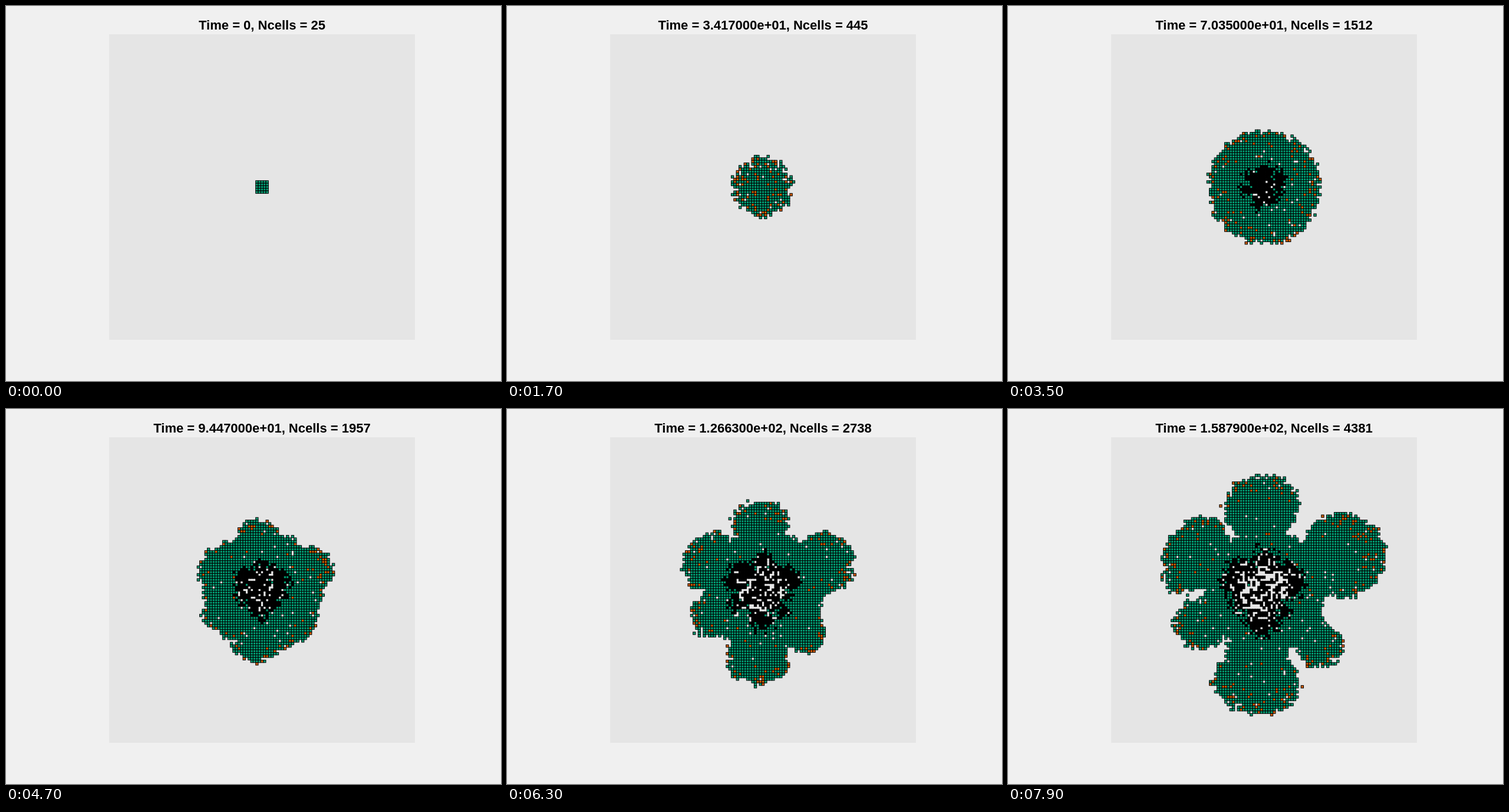
An HTML page with a canvas for the animation above (8 s loop, 840 by 637 pixels).

```html
<!DOCTYPE html>
<html lang="en">
<head>
<meta charset="utf-8">
<title>Growing cell colony</title>
<style>
  html, body { margin: 0; width: 100%; height: 100%; overflow: hidden; background: #f0f0f0; }
  canvas, svg { position: absolute; left: 0; top: 0; }
  text { font: bold 22px "Liberation Sans", Arial, sans-serif; text-anchor: middle; fill: #000; }
</style>
</head>
<body>
<canvas id="stage" width="840" height="637"></canvas>
<svg width="840" height="637"><text id="title" x="434.5" y="40"></text></svg>
<script>
const STEPS = 80, STEP_MS = 100, TIME_STEP = 2.01;
const PITCH = 4.325, REACH = 52, CX = 434.5, CY = 307.5;
const GREEN = '#009e73', ORANGE = '#d55e00', BLACK = '#000';
const BUDDING = 47;     // step at which the lobes break away
const SUPPLY = 60;      // depth in pixels that nutrients reach
const ctx = document.getElementById('stage').getContext('2d');
const title = document.getElementById('title');

// Lobes at the end: direction in degrees, tip distance, half length, half width
const LOBES = [
  [-92, 196, 53, 63], [-24, 216, 71, 71], [45, 173, 38, 38],
  [95, 210, 55, 73], [152, 165, 42, 43], [207, 181, 47, 70]
];
// Cell count at a few steps
const COUNT = [[0, 25], [17, 445], [35, 1512], [47, 1957], [63, 2738], [71, 3357], [79, 4381]];

const clamp = v => Math.max(0, Math.min(1, v));
const lerp = (a, b, p) => a + (b - a) * p;

function hash(i, j, seed) {
  let h = Math.imul(i + 400, 374761393) ^ Math.imul(j + 700, 668265263) ^ Math.imul(seed + 11, 1274126177);
  h = Math.imul(h ^ (h >>> 15), 2246822519);
  h = Math.imul(h ^ (h >>> 13), 3266489917);
  return ((h ^ (h >>> 16)) >>> 0) / 4294967296;
}

function smoothNoise(x, y, seed) {
  const i = Math.floor(x), j = Math.floor(y);
  const row = n => lerp(hash(i, n, seed), hash(i + 1, n, seed), x - i);
  return lerp(row(j), row(j + 1), y - j) - 0.5;
}

// Round body, lobes and dead core at one step
function shapeAt(k) {
  const body = 104 / (1 + Math.exp((17.5 - k) / 7.2));
  const core = Math.min(body - SUPPLY, 1.37 * k - 14);
  const early = Math.min(1, k / BUDDING) ** 0.9;
  const late = clamp((k - BUDDING) / (STEPS - 1 - BUDDING));
  const size = end => early * lerp(20 + 0.33 * end, end, late ** 1.7);
  const lobes = LOBES.map(([deg, end, halfLength, halfWidth]) => {
    const tip = early * lerp(60 + 0.3 * end, end, late ** 1.2);
    const a = size(halfLength), b = size(halfWidth), angle = deg * Math.PI / 180;
    return {
      cos: Math.cos(angle), sin: Math.sin(angle), a, b, centre: tip - a,
      deadCentre: Math.min(core, 0.42 * tip * lerp(0.6, 1, late)),
      deadRadius: Math.min(core, 0.45 * b)
    };
  });
  return { body, core, lobes };
}

// Signed distances, negative inside; x and y are measured from the centre
function lobeDistance(x, y, { cos, sin, a, b, centre }) {
  const u = x * cos + y * sin, v = y * cos - x * sin;
  const head = (Math.hypot((u - centre) / a, v / b) - 1) * Math.min(a, b);
  return u > 0 && u < centre ? Math.min(head, Math.abs(v) - 0.7 * b) : head;
}

function colonyDistance(x, y, { body, lobes }) {
  return Math.min(Math.hypot(x, y) - body, ...lobes.map(l => lobeDistance(x, y, l)));
}

function coreDistance(x, y, { core, lobes }) {
  if (core <= 0) return Infinity;
  return Math.min(Math.hypot(x, y) - core, ...lobes.map(l =>
    Math.hypot(x - l.cos * l.deadCentre, y - l.sin * l.deadCentre) - l.deadRadius));
}

const shapes = Array.from({ length: STEPS }, (_, k) => shapeAt(k));

function firstStep(test, from) {
  for (let k = from; k < STEPS; k++) if (test(shapes[k])) return k;
  return Infinity;
}

function makeCell(i, j) {
  const x = i * PITCH, y = j * PITCH;
  const rough = (seed, broad, fine) =>
    smoothNoise(i / 3, j / 3, seed) * broad + (hash(i, j, seed + 1) - 0.5) * fine;

  const edge = rough(1, 9, 8);
  const seeded = Math.max(Math.abs(i), Math.abs(j)) <= 2;
  const born = seeded ? 0 : firstStep(s => colonyDistance(x, y, s) + edge < 0, 1);
  if (born === Infinity) return null;

  const fringe = rough(3, 10, 16) + (hash(i, j, 5) > 0.93 ? 14 : 0);
  const dies = firstStep(s => coreDistance(x, y, s) + fringe < 0, born);
  const gone = dies + 60 * (-Math.log(1 - hash(i, j, 6))) ** (1 / 1.3);
  return { i, j, born, dies, gone, left: CX + x - PITCH / 2, top: CY + y - PITCH / 2 };
}

const cells = [];
for (let j = -REACH; j <= REACH; j++) {
  for (let i = -REACH; i <= REACH; i++) {
    const cell = makeCell(i, j);
    if (cell) cells.push(cell);
  }
}

// Fill colour of a cell at a step, or null where the site is empty
function colourOf({ i, j, born, dies, gone }, k) {
  if (k < born || k >= gone) return null;
  if (k >= dies) return BLACK;
  const age = k - born, started = clamp(k / 8);
  const epoch = Math.floor(k / 4 + hash(i, j, 7));
  const empty = age < 4 ? 0.09 : 0.02;
  if (hash(i, j, 100 + epoch) < empty * started) return null;
  const fresh = age < 6 ? 0.18 : age < 13 ? 0.08 : 0.012;
  const young = 0.2 * clamp((31 - k) / 12);
  return hash(i, j, 200 + epoch) < Math.max(fresh, young) * started ? ORANGE : GREEN;
}

// Smooth curve through the logarithms of the known counts
function countAt(k) {
  const at = n => COUNT[Math.max(0, Math.min(COUNT.length - 1, n))];
  const log = n => Math.log(at(n)[1]);
  const slope = n => (log(n + 1) - log(n - 1)) / (at(n + 1)[0] - at(n - 1)[0]);
  let n = 0;
  while (n < COUNT.length - 2 && k >= at(n + 1)[0]) n++;
  const span = at(n + 1)[0] - at(n)[0], t = (k - at(n)[0]) / span;
  const bend = span * t * (1 - t) * (slope(n) * (1 - t) - slope(n + 1) * t);
  return Math.round(Math.exp(lerp(log(n), log(n + 1), t * t * (3 - 2 * t)) + bend));
}

function label(k) {
  const time = k ? (k * TIME_STEP).toExponential(6).replace(/e\+(\d)$/, 'e+0$1') : '0';
  return `Time = ${time}, Ncells = ${countAt(k)}`;
}

function draw(k) {
  ctx.fillStyle = '#f0f0f0';
  ctx.fillRect(0, 0, 840, 637);
  ctx.fillStyle = '#e5e5e5';
  ctx.fillRect(175, 48, 519, 519);

  ctx.strokeStyle = BLACK;
  ctx.lineWidth = 1;
  for (const cell of cells) {
    const colour = colourOf(cell, k);
    if (!colour) continue;
    ctx.fillStyle = colour;
    ctx.fillRect(cell.left, cell.top, PITCH, PITCH);
    ctx.strokeRect(cell.left, cell.top, PITCH, PITCH);
  }
  title.textContent = label(k);
}

let shown = -1;
const start = performance.now();
function tick() {
  const k = Math.floor((performance.now() - start) / STEP_MS) % STEPS;
  if (k !== shown) draw(shown = k);
  requestAnimationFrame(tick);
}
tick();
</script>
</body>
</html>
```
